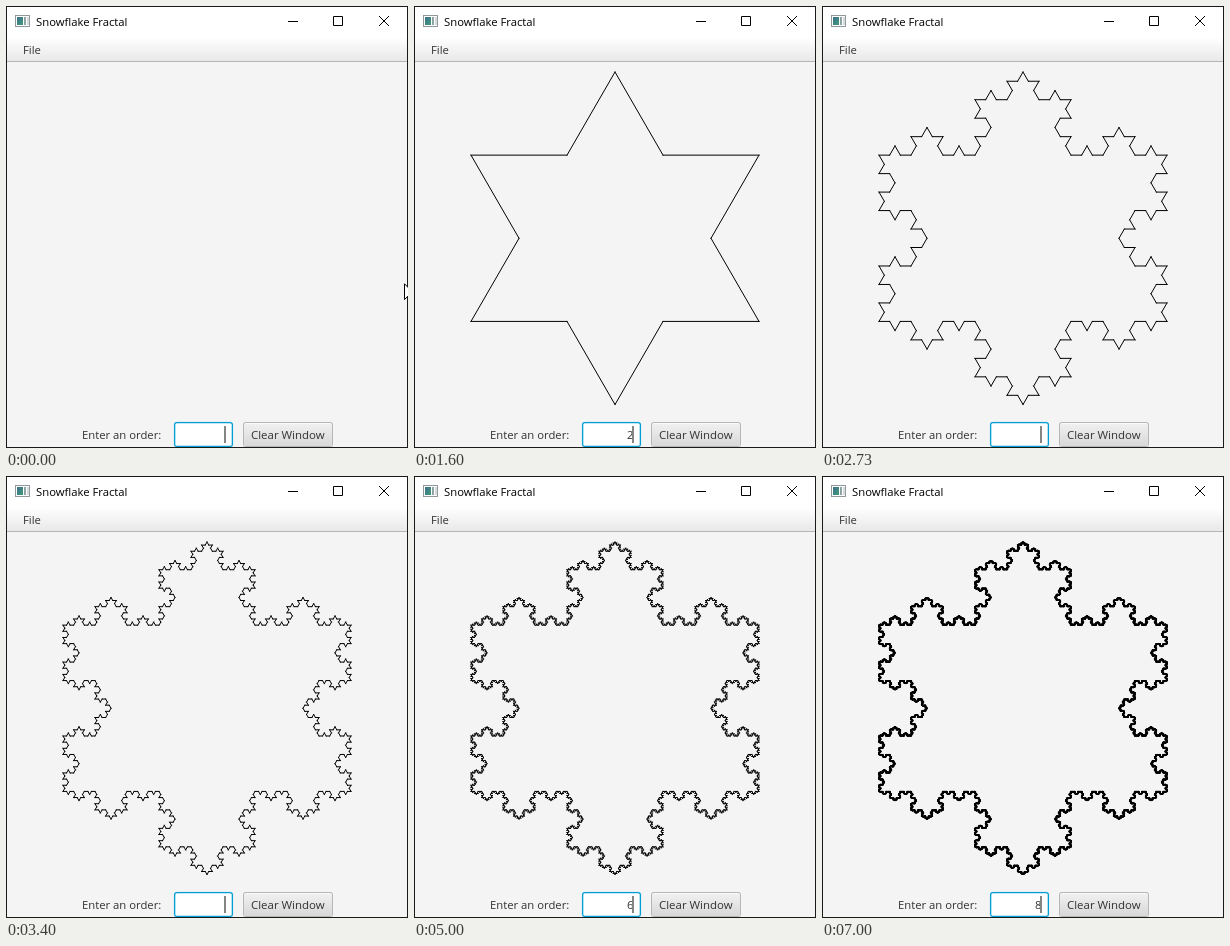
Recreate the animation shown at these times as an HTML page with a canvas. Size 402 by 442 pixels, loop 8000 ms.

```html
<!DOCTYPE html>
<html lang="en">
<head>
<meta charset="utf-8">
<title>Snowflake Fractal</title>
<style>
  html, body { margin: 0; width: 100%; height: 100%; overflow: hidden; background: #f4f4f4; }
  svg, canvas { position: absolute; left: 0; top: 0; width: 402px; height: 442px; }
  text { font: 11.3px "Open Sans", "Noto Sans", sans-serif; fill: #333; }
</style>
</head>
<body>
<svg viewBox="0 0 402 442">
  <defs>
    <linearGradient id="menu" x2="0" y2="1">
      <stop stop-color="#fff"/><stop offset="1" stop-color="#e8e8e8"/>
    </linearGradient>
    <linearGradient id="button" x2="0" y2="1">
      <stop stop-color="#f0f0f0"/><stop offset="1" stop-color="#d8d8d8"/>
    </linearGradient>
    <linearGradient id="teal" x2="1" y2="1">
      <stop stop-color="#3f6f8c"/><stop offset="1" stop-color="#3f9a7d"/>
    </linearGradient>
  </defs>

  <rect width="402" height="442" fill="#f4f4f4"/>
  <rect width="402" height="31" fill="#fff"/>
  <rect y="31" width="402" height="24" fill="url(#menu)"/>
  <rect y="55" width="402" height="1" fill="#b5b5b5"/>

  <rect x="9.5" y="9.5" width="14" height="11" fill="#fff" stroke="#92999d"/>
  <rect x="11" y="11" width="6" height="8" fill="url(#teal)"/>
  <rect x="18" y="11" width="2" height="8" fill="#8da3a6"/>
  <rect x="21" y="11" width="2" height="8" fill="#d5dadc"/>
  <text x="30" y="20" style="fill:#000">Snowflake Fractal</text>
  <path d="M282 15.5h10M327.5 10.5h9v9h-9zM373 10l10 10M383 10l-10 10" fill="none" stroke="#000"/>
  <text x="17" y="48">File</text>

  <text x="76" y="433">Enter an order:</text>
  <rect x="167.5" y="415.5" width="60" height="26" rx="3.5" fill="#d3eaf3"/>
  <rect x="168" y="416" width="59" height="25" rx="3" fill="#039ed3"/>
  <rect x="169.3" y="417.3" width="56.4" height="22.4" rx="1.5" fill="#fff"/>
  <text id="digit" x="219.5" y="433" text-anchor="end"></text>
  <rect id="caret" x="218" y="420" width="2" height="17" fill="#858585"/>

  <rect x="237" y="416" width="90" height="25" rx="3" fill="#b7b7b7"/>
  <rect x="238" y="417" width="88" height="23" rx="2" fill="#fafafa"/>
  <rect x="238" y="418" width="88" height="22" rx="2" fill="url(#button)"/>
  <text x="245" y="433" style="font-size:11.45px">Clear Window</text>

  <rect x=".5" y=".5" width="401" height="441" fill="none" stroke="#1a1a1a"/>
  <path id="pointer" d="M.5 .8V16.5L4.2 13 6.8 18.5 9 17.5 6.5 12H11.5Z" fill="#fff" stroke="#000"/>
</svg>

<script>
const LOOP = 8000, SIDE = 288, MAX_ORDER = 7;
const HEIGHT = SIDE * Math.sqrt(3) / 2;
const $ = id => document.getElementById(id);

// Each row: time, snowflake order, typed digit, caret visible.
const states = [
  [0, 0, "", 1], [530, 0, "", 0], [1000, 0, "1", 1], [1200, 1, "", 1],
  [1600, 1, "2", 1], [1870, 2, "", 1], [2200, 2, "3", 1], [2730, 3, "", 1],
  [3130, 3, "4", 1], [3400, 4, "", 1], [3930, 4, "", 0], [4000, 4, "5", 1],
  [4330, 5, "", 1], [4870, 5, "", 0], [5000, 5, "6", 1], [5330, 6, "", 1],
  [5800, 6, "", 0], [5870, 6, "7", 1], [6470, 7, "", 1], [6800, 7, "", 0],
  [7000, 7, "8", 1]
];
// Each row: time, x, y.
const pointerPath = [[0, 398, 277], [70, 391, 285], [130, 387, 290], [270, 396, 292], [330, 420, 292]];

// Every segment is stroked on its own, so overlapping edges darken at high orders.
function koch(g, x1, y1, x2, y2, depth) {
  if (!depth) {
    g.beginPath();
    g.moveTo(x1, y1);
    g.lineTo(x2, y2);
    g.stroke();
    return;
  }
  const dx = (x2 - x1) / 3, dy = (y2 - y1) / 3, k = Math.sqrt(3) / 2;
  const ax = x1 + dx, ay = y1 + dy, bx = x2 - dx, by = y2 - dy;
  const px = ax + dx / 2 + dy * k, py = ay + dy / 2 - dx * k;
  koch(g, x1, y1, ax, ay, depth - 1);
  koch(g, ax, ay, px, py, depth - 1);
  koch(g, px, py, bx, by, depth - 1);
  koch(g, bx, by, x2, y2, depth - 1);
}

function makeSnowflake(order) {
  const canvas = document.createElement("canvas");
  canvas.width = 402;
  canvas.height = 442;
  canvas.style.visibility = "hidden";
  const g = canvas.getContext("2d", { willReadFrequently: true });
  g.lineCap = "square";
  const top = [201, 66];
  const right = [201 + SIDE / 2, 66 + HEIGHT];
  const left = [201 - SIDE / 2, 66 + HEIGHT];
  koch(g, ...top, ...right, order);
  koch(g, ...right, ...left, order);
  koch(g, ...left, ...top, order);
  document.body.append(canvas);
  return canvas;
}

const snowflakes = Array.from({ length: MAX_ORDER }, (_, i) => makeSnowflake(i + 1));
const latest = (rows, t) => rows.findLast(row => row[0] <= t);

function render(t) {
  const [, order, digit, caret] = latest(states, t);
  const [, x, y] = latest(pointerPath, t);
  snowflakes.forEach((c, i) => c.style.visibility = i + 1 === order ? "visible" : "hidden");
  $("digit").textContent = digit;
  $("caret").setAttribute("visibility", caret ? "visible" : "hidden");
  $("pointer").setAttribute("transform", `translate(${x} ${y})`);
}

let start;
function tick(now) {
  start ??= now;
  render((now - start) % LOOP);
  requestAnimationFrame(tick);
}
render(0);
requestAnimationFrame(tick);
</script>
</body>
</html>
```
